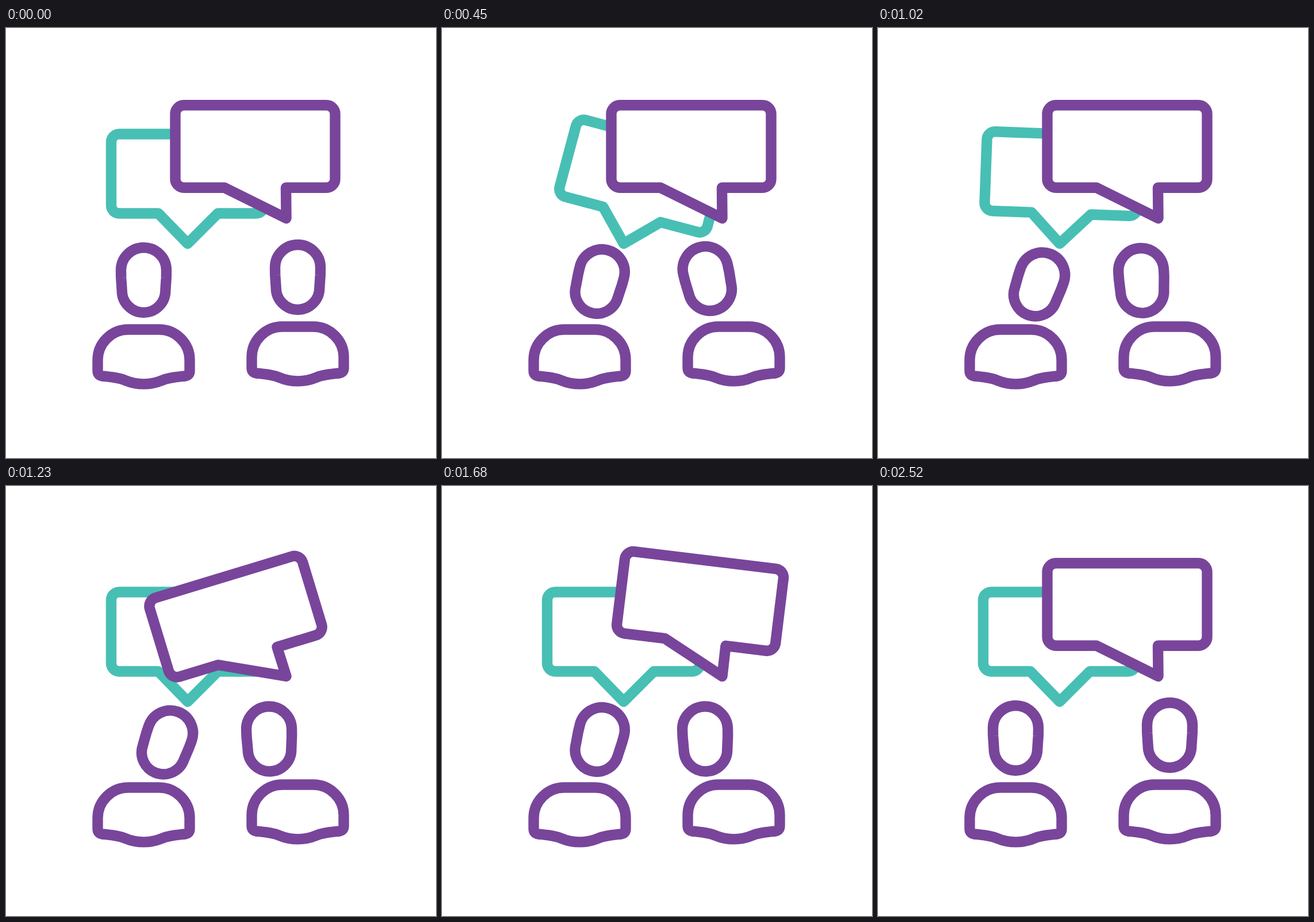
These frames come from a looping animation (748x748 px, 4550 ms). An HTML page:

```html
<!DOCTYPE html>
<html lang="en">
<head>
<meta charset="utf-8">
<title>Conversation</title>
<style>
  html, body { margin: 0; width: 100%; height: 100%; overflow: hidden; background: #fff; }
  svg { display: block; width: 100%; height: 100%; }
  path { fill: #fff; stroke: #78459b; stroke-width: 18.4; stroke-linejoin: round; }
  #teal { stroke: #48bfb4; }
</style>
</head>
<body>
<svg viewBox="0 0 748 748">
  <defs>
    <path id="face" d="M-39.5 -17A39.5 39.5 0 0 1 39.5 -17L39.3 -4L37.8 18.5A37.8 38 0 0 1 -37.8 18.5L-39.3 -4Z"/>
    <path id="torso" d="M-80 -32V-51C-80 -80 -56 -104 -27 -104H27C56 -104 80 -80 80 -51V-32Q80 -24 72 -23C54 -21 44 -20.5 32 -15.5S10 -9.1 0 -9.1S-20 -10.5 -32 -15.5S-54 -21 -72 -23Q-80 -24 -80 -32Z"/>
  </defs>
  <path id="teal" d="M197 184.5H435A14 14 0 0 1 449 198.5V308.5A14 14 0 0 1 435 322.5H368.5L316 375L265 322.5H197A14 14 0 0 1 183 308.5V198.5A14 14 0 0 1 197 184.5Z"/>
  <path id="purple" d="M309.5 134.3H557.5A15 15 0 0 1 572.5 149.3V262.7A15 15 0 0 1 557.5 277.7H487L487.5 331L380 277.7H309.5A15 15 0 0 1 294.5 262.7V149.3A15 15 0 0 1 309.5 134.3Z"/>
  <g id="left"><use href="#torso"/><use class="head" href="#face"/></g>
  <g id="right"><use href="#torso"/><use class="head" href="#face"/></g>
</svg>
<script>
const LOOP = 4550, STEP = 30, MOVING = 2520;
const SWING = 1120, SETTLE = 450, MOVE = 230, NOD = 400;
const $ = s => document.querySelector(s);

const clamp = v => Math.min(1, Math.max(0, v));

// Smooth rise from 0 to 1 between two times
const ease = (t, from, span) => (1 - Math.cos(Math.PI * clamp((t - from) / span))) / 2;

// Oscillation that fades out evenly over its span
function wobble(t, span, turns) {
  const k = clamp(t / span);
  return (1 - k) * Math.sin(2 * Math.PI * turns * k ** 1.08);
}

const bubbles = [
  { el: $('#teal'), pivot: '316 375', start: 0 },
  { el: $('#purple'), pivot: '487.5 331', start: 1140 }
];

// Poses are [dx, dy, angle]; "back" is when the person starts to sit up again
const people = [
  { el: $('#left'), x: 239.5, y: 628.5, back: 2070,
    lean: [34.5, 2.5, 14.5], nod: [6, 5, 5], nodStart: 530, nodEnd: 1260 },
  { el: $('#right'), x: 507.5, y: 623.5, back: 1860,
    lean: [-45.5, 2.5, -13], nod: [-4, 4, 11.5], nodStart: 720, nodEnd: 1860 }
];

function draw(t) {
  for (const b of bubbles) {
    const angle = -25 * wobble(t - b.start, SWING, 2);
    b.el.setAttribute('transform', `rotate(${angle} ${b.pivot})`);
  }

  for (const p of people) {
    const squash = 0.062 * (wobble(t, SETTLE, 1) + wobble(t - p.back, SETTLE, 1));
    const lean = ease(t, 0, MOVE) - ease(t, p.back, MOVE);
    const nod = ease(t, p.nodStart, NOD) - ease(t, p.nodEnd, MOVE);
    const [dx, dy, turn] = p.lean.map((v, i) => v * lean + p.nod[i] * nod);
    p.el.setAttribute('transform',
      `translate(${p.x} ${p.y}) scale(${1 + squash} ${1 - squash})`);
    p.el.querySelector('.head').setAttribute('transform',
      `translate(${dx} ${dy - 190}) rotate(${turn})`);
  }
}

const start = performance.now();
function tick(now) {
  const t = Math.max(0, now - start) % LOOP;
  draw(Math.min(MOVING, Math.floor(t / STEP) * STEP));
  requestAnimationFrame(tick);
}
draw(0);
requestAnimationFrame(tick);
</script>
</body>
</html>
```
